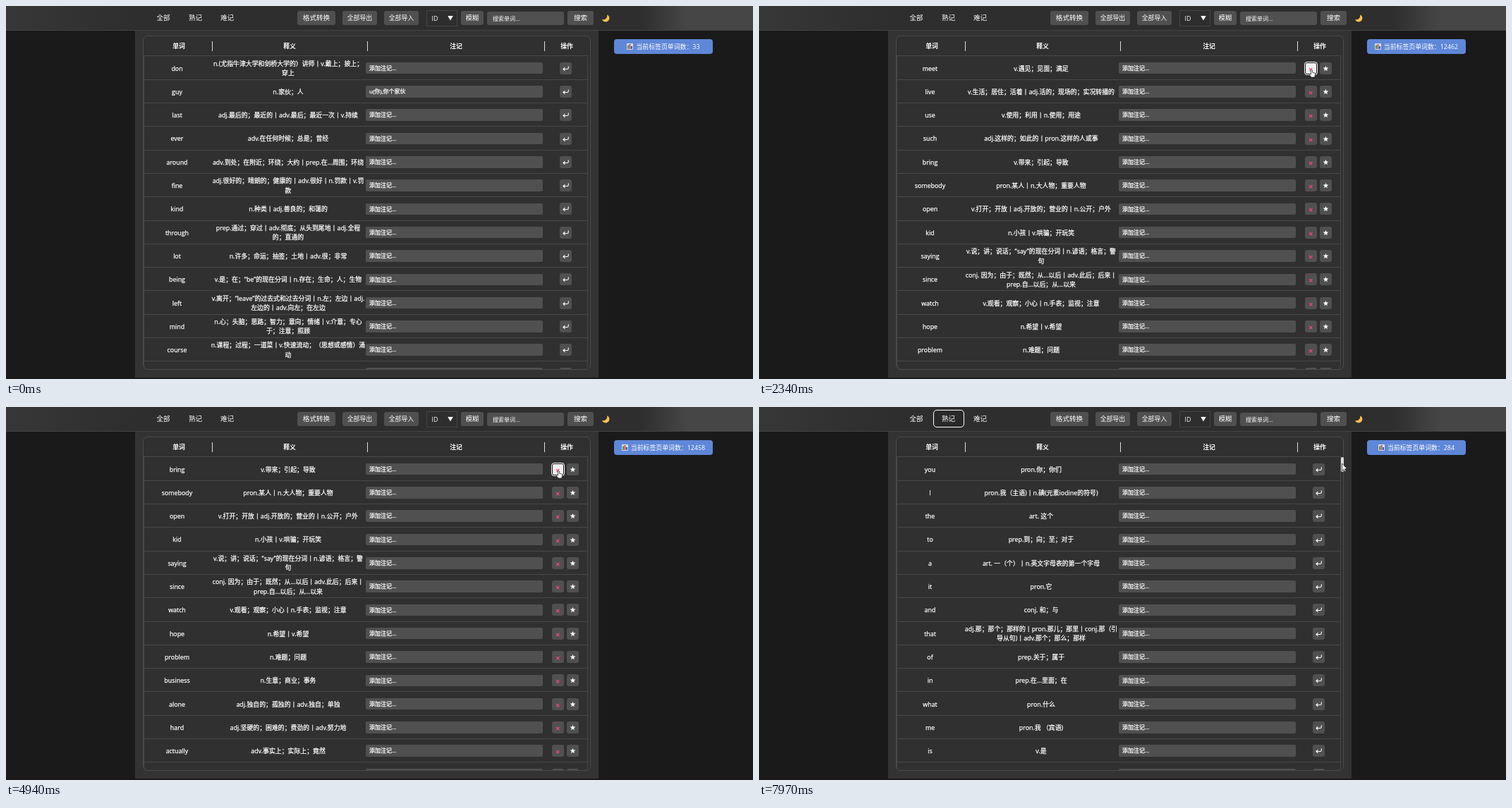
These frames come from a looping animation (1059x529 px, 8000 ms). An HTML page:

```html
<!DOCTYPE html>
<html lang="zh-CN">
<head>
<meta charset="utf-8">
<title>单词表</title>
<style>
  * { box-sizing: border-box; }
  html, body { margin: 0; width: 100%; height: 100%; overflow: hidden; background: #1a1a1a; }
  body {
    position: relative; color: #fff; white-space: pre; text-spacing-trim: space-all;
    font: 500 8.9px/13.3px "Open Sans", "Noto Sans CJK SC", "Noto Sans CJK", sans-serif;
  }
  .box { position: absolute; display: flex; align-items: center; justify-content: center; }
  #bar {
    position: absolute; left: 0; top: 0; width: 1059px; height: 35px; border-bottom: 1px solid #434343;
    background: linear-gradient(90deg, #373737, #2e2e2e 180px, #2e2e2e 900px, #464646 965px);
  }
  .btn { background: #505050; border-radius: 3px; }
  .tab { top: 4px; height: 25px; font-size: 9.6px; border: 1px solid transparent; border-radius: 5px; }
  .tab.focus { border-color: #fff; background: #292929; }
  #page { position: absolute; left: 183px; top: 35px; width: 657px; height: 492px; background: #333; }
  #panel {
    position: absolute; left: 194px; top: 42px; width: 635px; height: 474px;
    border: 1px solid #4b4b4b; border-radius: 7px; background: #303030;
  }
  .head { top: 49px; height: 15px; font-weight: 700; }
  .rule { position: absolute; top: 50px; width: 1px; height: 14px; background: #ddd; }
  #list {
    position: absolute; left: 195px; top: 70px; width: 630px; height: 445px; overflow: hidden;
    border: solid #484848; border-width: 1px 1px 0; border-radius: 0 0 6px 6px;
    -webkit-text-stroke: .25px #fff;
  }
  .row {
    position: absolute; left: -1px; width: 630px; height: 33.3px;
    display: flex; align-items: center; box-shadow: inset 0 -1px #484848; text-align: center;
  }
  .word { width: 95px; }
  .def { width: 220px; display: flex; justify-content: center; }
  .note {
    width: 251px; height: 16.5px; padding-left: 5px; border-radius: 2px;
    background: #505050; font-size: 8px; line-height: 16.5px; text-align: left;
  }
  .act { width: 64px; display: flex; gap: 4px; justify-content: center; }
  .act .btn { width: 17px; height: 17px; }
  .act svg, .icon { display: block; fill: none; }
  .pressed { background: #f0f0f0 !important; outline: 1px solid #fff; box-shadow: inset 0 0 0 1px #111; }
  #count { left: 861.7px; top: 47px; width: 140.6px; height: 20.5px; gap: 4px; border-radius: 4px; background: #5f87d8; }
  #thumb { position: absolute; left: 825px; top: 71px; width: 4px; height: 21px; border-radius: 2px; background: #ddd; }
  #cursor { position: absolute; left: 0; top: 0; overflow: visible; }
</style>
</head>
<body>
<div id="bar"></div>
<div id="page"></div>
<div id="panel"></div>
<div id="list"></div>
<div id="thumb"></div>
<div id="count" class="box">
  <svg class="icon" width="9" height="9"><rect width="9" height="9" rx="1" fill="#d5dce6"/><path d="M2 2.5V8" stroke="#3f9f55" stroke-width="2"/><path d="M4.5 1V8" stroke="#d2475c" stroke-width="2"/><path d="M7 4V8" stroke="#2f62b5" stroke-width="2"/></svg><span id="total"></span>
</div>
<svg class="icon" style="position:absolute;left:844px;top:11px" width="13" height="13"><path d="M8 1.2A5.3 5.3 0 1 1 1.1 8 5.5 5.5 0 0 0 8 1.2" fill="#fbbf50"/></svg>
<svg id="cursor" width="1" height="1"></svg>
<script>
const LOOP = 8000, ROW = 33.3;
const $ = id => document.getElementById(id);
const clamp = v => Math.max(0, Math.min(1, v));

function addBox(cls, left, width, text, css = '') {
  const el = document.createElement('div');
  el.className = 'box ' + cls;
  el.style.cssText = `left:${left}px;width:${width}px;${css}`;
  el.textContent = text;
  document.body.insertBefore(el, $('cursor'));
  return el;
}

const tabs = [['全部', 201], ['熟记', 246.5], ['难记', 291.5]].map(([s, x]) => addBox('tab', x, 44, s));
const barButton = (s, x, w, size = 8.9) => addBox('btn', x, w, s, `top:7px;height:20px;font-size:${size}px`);
barButton('格式转换', 413, 54, 9.6);
barButton('全部导出', 477, 49);
barButton('全部导入', 536, 49);
barButton('模糊', 645, 32, 9.2);
barButton('搜索', 796, 37, 9.6);
addBox('', 596, 44, 'ID', 'top:6px;height:23px;border:1px solid #444;padding-right:20px');
addBox('', 622, 16, '▼', 'top:6px;height:22px;font-size:8px');
addBox('btn', 682, 109, '搜索单词...', 'top:8px;height:19px;font-size:8px;justify-content:flex-start;padding-left:8px');

[['单词', 245], ['释义', 402], ['注记', 638], ['操作', 795]].forEach(([s, x]) => addBox('head', x - 20, 40, s));
[292, 512, 763].forEach(x => addBox('rule', x, 1, ''));

// One entry per line: word = definition (/ breaks the line) = optional note
const parse = text => text.trim().split('\n').map(line => line.split('='));
const hardWords = parse(`
don=n.(尤指牛津大学和剑桥大学的）讲师丨v.戴上；披上；/穿上
guy=n.家伙；人=u(你),你个家伙
last=adj.最后的；最近的丨adv.最后；最近一次丨v.持续
ever=adv.在任何时候；总是；曾经
around=adv.到处；在附近；环绕；大约丨prep.在...周围；环绕
fine=adj.很好的；晴朗的；健康的丨adv.很好丨n.罚款丨v.罚/款
kind=n.种类丨adj.善良的；和蔼的
through=prep.通过；穿过丨adv.彻底；从头到尾地丨adj.全程/的；直通的
lot=n.许多；命运；抽签；土地丨adv.很；非常
being=v.是；在；“be”的现在分词丨n.存在；生命；人；生物
left=v.离开；“leave”的过去式和过去分词丨n.左；左边丨adj./左边的丨adv.向左；在左边
mind=n.心；头脑；思路；智力；意向；情绪丨v.介意；专心/于；注意；照顾
course=n.课程；过程；一道菜丨v.快速流动；（思想或感情）涌/动
=`);
const allWords = parse(`
meet=v.遇见；见面；满足
live=v.生活；居住；活着丨adj.活的；现场的；实况转播的
use=v.使用；利用丨n.使用；用途
such=adj.这样的；如此的丨pron.这样的人或事
bring=v.带来；引起；导致
somebody=pron.某人丨n.大人物；重要人物
open=v.打开；开放丨adj.开放的；营业的丨n.公开；户外
kid=n.小孩丨v.哄骗；开玩笑
saying=v.说；讲；说话；“say”的现在分词丨n.谚语；格言；警/句
since=conj. 因为；由于；既然；从...以后丨adv.此后；后来丨/prep.自...以后；从...以来
watch=v.观看；观察；小心丨n.手表；监视；注意
hope=n.希望丨v.希望
problem=n.难题；问题
business=n.生意；商业；事务
alone=adj.独自的；孤独的丨adv.独自；单独
hard=adj.坚硬的；困难的；费劲的丨adv.努力地
actually=adv.事实上；实际上；竟然
both=pron.两者丨adj.两者的丨conj.不仅...而且...
few=adj.不多；很少丨n.几个；几乎没有丨pron.一些；很少/数`);
const knownWords = parse(`
you=pron.你；你们
I=pron.我（主语)丨n.碘(元素iodine的符号)
the=art. 这个
to=prep.到；向；至；对于
a=art. 一（个）丨n.英文字母表的第一个字母
it=pron.它
and=conj. 和；与
that=adj.那；那个；那样的丨pron.那儿；那里丨conj.那（引/导从句)丨adv.那个；那么；那样
of=prep.关于；属于
in=prep.在...里面；在
what=pron.什么
me=pron.我 （宾语)
is=v.是
=`);

const svgIcon = (d, color, extra = '') =>
  `<svg width="17" height="17"><path d="${d}" stroke="${color}" ${extra}/></svg>`;
const backButton = `<div class="btn">${svgIcon('M12.3 5.5v2.2q0 1.8-1.8 1.8H5M7.4 7.2L5 9.5l2.4 2.3', '#fff', 'stroke-width="1.1"')}</div>`;
const editButtons =
  `<div class="btn remove">${svgIcon('M6 8l4.4 4.4m0-4.4L6 12.4', '#f0477c', 'stroke-width="1.1"')}</div>` +
  `<div class="btn">${svgIcon('M8.5 4.8l1 2.7 2.9.1-2.3 1.8.8 2.8-2.4-1.6-2.4 1.6.8-2.8-2.3-1.8 2.9-.1z', 'none', 'fill="#fff"')}</div>`;

function rowHtml([word, def, note = '添加注记...'], i, buttons) {
  return `<div class="row" style="top:${ROW * i + 0.5}px"><div class="word">${word}</div>` +
    `<div class="def">${def.replace('/', '\n')}</div><div class="note">${note}</div>` +
    `<div class="act">${buttons}</div></div>`;
}

const SHOW_ALL = 1190, SHOW_KNOWN = 6310;
const clicks = [[2200, 2350], [2560, 2710], [3080, 3230], [4240, 4390], [4940, 5120]];  // press, release

// Pointer path: time, x, y
const path = [
  [330, 766, -4], [420, 757, 26], [520, 700, 52], [700, 520, 50], [880, 310, 30], [1000, 227, 19],
  [1060, 223, 18], [1230, 223, 18], [1330, 330, 45], [1450, 560, 88], [1570, 705.5, 107], [1750, 765, 101],
  [1950, 783.5, 90], [5270, 783.5, 90], [5380, 690, 76], [5500, 520, 52], [5620, 387, 38], [5800, 310, 35],
  [5920, 280, 34], [6040, 267, 18], [6350, 267, 18], [6450, 320, 38], [6590, 460, 66], [6730, 581, 85],
  [6900, 680, 106], [7080, 765, 120], [7260, 815, 108], [7450, 827, 89], [7600, 827, 85], [7760, 826.5, 82],
  [7900, 826.5, 80], [8000, 826.5, 80]
];
function pointerAt(t) {
  const k = path.findIndex(p => p[0] > t);
  if (k < 1) return null;
  const [t0, x0, y0] = path[k - 1], [t1, x1, y1] = path[k];
  const f = (t - t0) / (t1 - t0);
  return [x0 + (x1 - x0) * f, y0 + (y1 - y0) * f];
}

const shapes = {
  arrow: '<path d="M0 0V10.6L2.4 8.4 4 12 5.6 11.2 4.1 7.8H7.3Z" fill="#fff" stroke="#111" stroke-width=".7"/>',
  hand: '<path d="M-1 1Q0-.6 1 1V4.2L4.3 5Q5.3 5.4 5.1 6.7L4.3 11H-.6L-3.2 7.3Q-3.2 6-2 6.2L-1 7Z" fill="#fff" stroke="#111" stroke-width=".7"/>',
  text: '<path d="M-2-4.5H2M-2 4.5H2M0-4.5V4.5" fill="none" stroke="#aaa" stroke-width=".9"/>'
};
const within = (v, a, b) => v >= a && v <= b;
function shapeAt(x, y) {
  const rowY = (y - 71) % ROW;
  if (within(x, 682, 791) && within(y, 8, 27)) return 'text';
  if (within(x, 510, 761) && y > 71 && within(rowY, 8, 25)) return 'text';
  if (within(y, 5, 29) && within(x, 202, 335)) return 'hand';
  if (within(x, 774, 791) && y > 71 && within(rowY, 8, 26)) return 'hand';
  return 'arrow';
}

let shownKey = '', shownShape = '';
function render(t) {
  const removed = clicks.filter(c => t >= c[1]).length;
  const view = t < SHOW_ALL ? 'hard' : t < SHOW_KNOWN ? 'all' : 'known';
  const key = view + removed;
  if (key !== shownKey) {
    shownKey = key;
    const words = { hard: hardWords, known: knownWords, all: allWords.slice(removed) }[view];
    const buttons = view === 'all' ? editButtons : backButton;
    $('list').innerHTML = words.slice(0, 14).map((w, i) => rowHtml(w, i, buttons)).join('');
    $('total').textContent = '当前标签页单词数：' + { hard: 33, all: 12462 - removed, known: 284 }[view];
  }

  tabs[0].classList.toggle('focus', within(t, 1110, clicks[0][0]));
  tabs[1].classList.toggle('focus', t >= 6220);

  const remove = document.querySelector('.remove');
  if (remove) {
    const since = Math.max(1920, ...clicks.map(c => c[1]).filter(end => end <= t));
    const glow = t < 5290 ? 22 * clamp((t - since) / 150) : 0;
    const level = Math.round(80 + glow);
    remove.style.background = `rgb(${level},${level},${level})`;
    remove.classList.toggle('pressed', clicks.some(([down, up]) => t >= down && t < up));
  }
  $('thumb').style.opacity = clamp((t - 7400) / 130);

  const p = pointerAt(t);
  $('cursor').style.display = p ? '' : 'none';
  if (p) {
    const shape = shapeAt(...p);
    if (shape !== shownShape) $('cursor').innerHTML = shapes[shownShape = shape];
    $('cursor').style.transform = `translate(${p[0]}px,${p[1]}px)`;
  }
}

const start = performance.now();
function tick() {
  render((performance.now() - start) % LOOP);
  requestAnimationFrame(tick);
}
tick();
</script>
</body>
</html>
```
